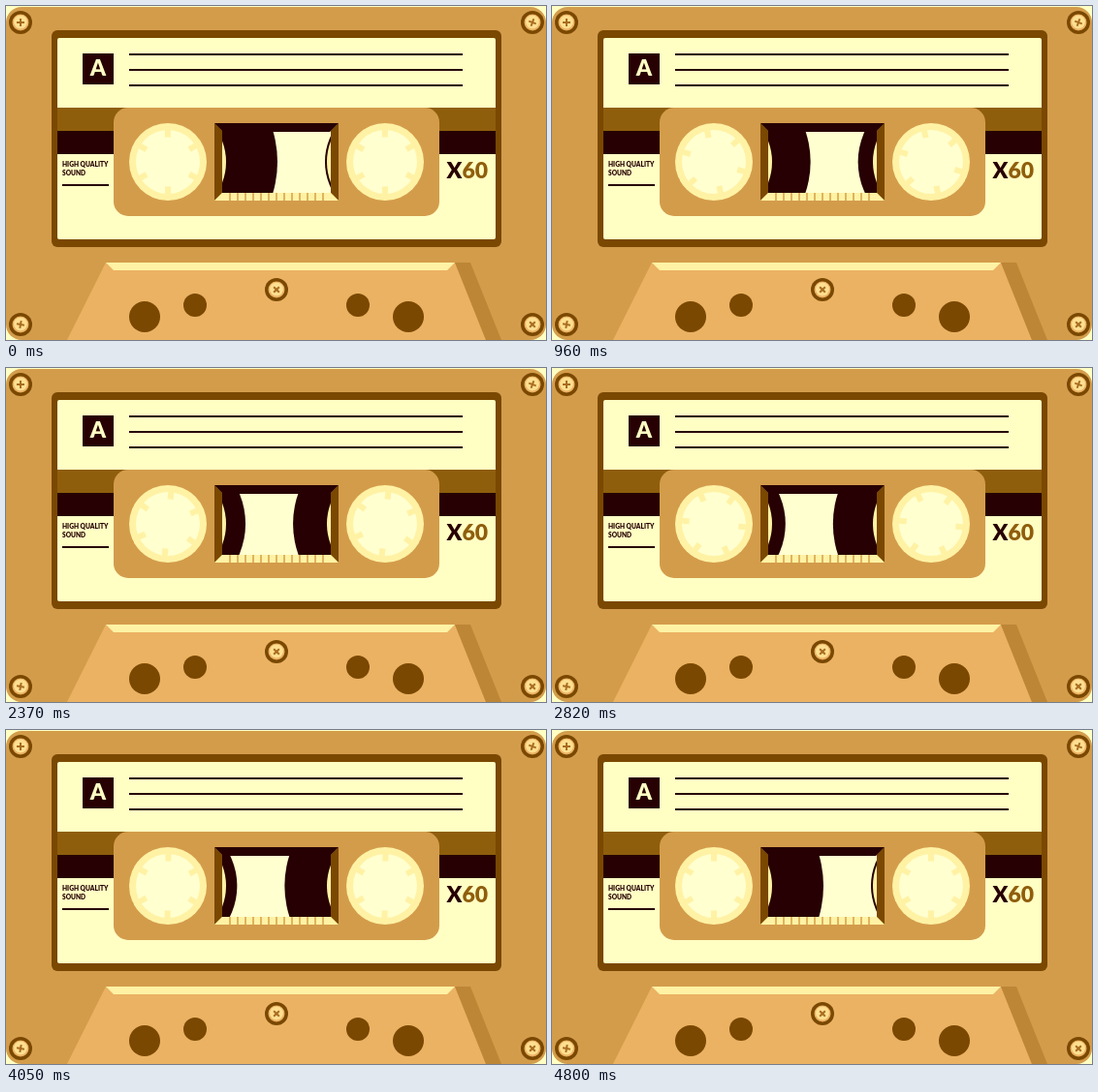
Recreate the animation shown at these times as an HTML page. Size 557 by 345 pixels, loop 5100 ms.

```html
<!DOCTYPE html>
<html lang="en">
<head>
<meta charset="utf-8">
<title>Cassette</title>
<style>
html, body { margin: 0; width: 100%; height: 100%; overflow: hidden; background: #ffffc4; }
svg { display: block; width: 557px; height: 345px; }
text { font-family: Lato, "Open Sans", sans-serif; font-weight: 900; }
.body { fill: #d39c4b; }
.brown { fill: #7a4800; }
.dark { fill: #270003; }
.pale { fill: #ffffc4; }
.cream { fill: #fff2a4; }
.tan { fill: #ebb263; }
</style>
</head>
<body>
<svg viewBox="0 0 557 345">
  <defs>
    <clipPath id="pane"><rect x="223" y="129" width="112" height="64"/></clipPath>
    <g id="screw">
      <circle class="brown" r="12"/>
      <circle class="tan" r="8.5"/>
      <circle r="7" cy="-.5" fill="#ffdf91"/>
    </g>
    <path id="cross" d="M-4 0H4M0-4V4" stroke="#a86d20" stroke-width="2"/>
    <g id="hub">
      <circle class="cream" r="40"/>
      <circle r="33" fill="#ffffd0"/>
    </g>
  </defs>

  <rect class="body" y="1" width="557" height="344" rx="16"/>
  <g id="screws"></g>

  <rect class="brown" x="47" y="25" width="464" height="224" rx="6"/>
  <rect class="pale" x="53" y="33" width="452" height="208" rx="2"/>
  <rect x="53" y="105" width="452" height="24" fill="#8f5e0d"/>
  <rect class="dark" x="53" y="129" width="452" height="24"/>
  <rect class="dark" x="79" y="49" width="32" height="32"/>
  <text class="pale" x="95" y="72" font-size="23" text-anchor="middle">A</text>
  <path d="M127 50H471M127 66H471M127 82H471M58 185H106" stroke="#270003" stroke-width="2"/>
  <g class="dark" font-size="6.6">
    <text x="58" y="166">HIGH QUALITY</text>
    <text x="58" y="175">SOUND</text>
  </g>
  <text class="dark" x="454.5" y="178" font-size="23">X<tspan fill="#8f5e0d">60</tspan></text>

  <rect class="body" x="111" y="105" width="336" height="112" rx="15"/>
  <g clip-path="url(#pane)">
    <rect x="223" y="129" width="112" height="64" fill="#ffffd0"/>
    <circle id="tapeL" class="dark" cx="167" cy="161"/>
    <circle id="tapeR" class="dark" cx="391" cy="161"/>
    <circle class="cream" cx="167" cy="161" r="60"/>
    <circle class="cream" cx="391" cy="161" r="60"/>
  </g>
  <path class="brown" d="M215 121l8 8v64l-8 8zM343 121l-8 8v64l8 8z"/>
  <path class="dark" d="M215 121H343L334 130H224z"/>
  <path class="cream" d="M215 201H343L335 193H223z"/>
  <path id="ticks" stroke="#dfb45f" stroke-width="2"/>

  <use href="#hub" x="167" y="161"/>
  <use href="#hub" x="391" y="161"/>
  <g id="teethL" class="cream"></g>
  <g id="teethR" class="cream"></g>

  <path class="tan" d="M103 265H463L495 345H63z"/>
  <path fill="#bd8636" d="M463 265H479L511 345H495z"/>
  <path class="cream" d="M103 265H463L455 273H111z"/>
  <g class="brown">
    <circle cx="143" cy="321" r="16"/>
    <circle cx="195" cy="309" r="12"/>
    <circle cx="363" cy="309" r="12"/>
    <circle cx="415" cy="321" r="16"/>
  </g>
  <g id="midScrew"></g>
</svg>
<script>
const $ = id => document.getElementById(id);

const screw = (x, y, turn) =>
  `<g transform="translate(${x} ${y})"><use href="#screw"/><use href="#cross" transform="rotate(${turn})"/></g>`;
$('screws').innerHTML =
  screw(15, 17, 0) + screw(543, 17, 20) + screw(15, 329, 10) + screw(543, 329, 45);
$('midScrew').innerHTML = screw(279, 293, 45);

$('ticks').setAttribute('d',
  Array.from({ length: 13 }, (_, i) => `M${231 + i * 8} 193v8`).join(''));

const teeth = Array.from({ length: 6 }, (_, i) =>
  `<rect x="-3" y="-33.5" width="6" height="8" transform="rotate(${i * 60})"/>`).join('');
$('teethL').innerHTML = $('teethR').innerHTML = teeth;

const LOOP = 5100, PLAY = 3600, REWIND = 3900, DONE = 4800;

// Share of tape wound onto the right reel.
function wound(t) {
  if (t < PLAY) return t / PLAY;
  if (t < REWIND) return 1;
  return Math.max(0, (DONE - t) / (DONE - REWIND));
}

function draw(now) {
  const p = wound(now % LOOP);
  $('tapeL').setAttribute('r', 113 - 50 * p);
  $('tapeR').setAttribute('r', 62 + 50 * p);
  const turn = `rotate(${-720 * p})`;
  $('teethL').setAttribute('transform', `translate(167 161) ${turn}`);
  $('teethR').setAttribute('transform', `translate(391 161) ${turn}`);
}

const start = performance.now();
function tick() {
  draw(performance.now() - start);
  requestAnimationFrame(tick);
}
draw(0);
requestAnimationFrame(tick);
</script>
</body>
</html>
```
